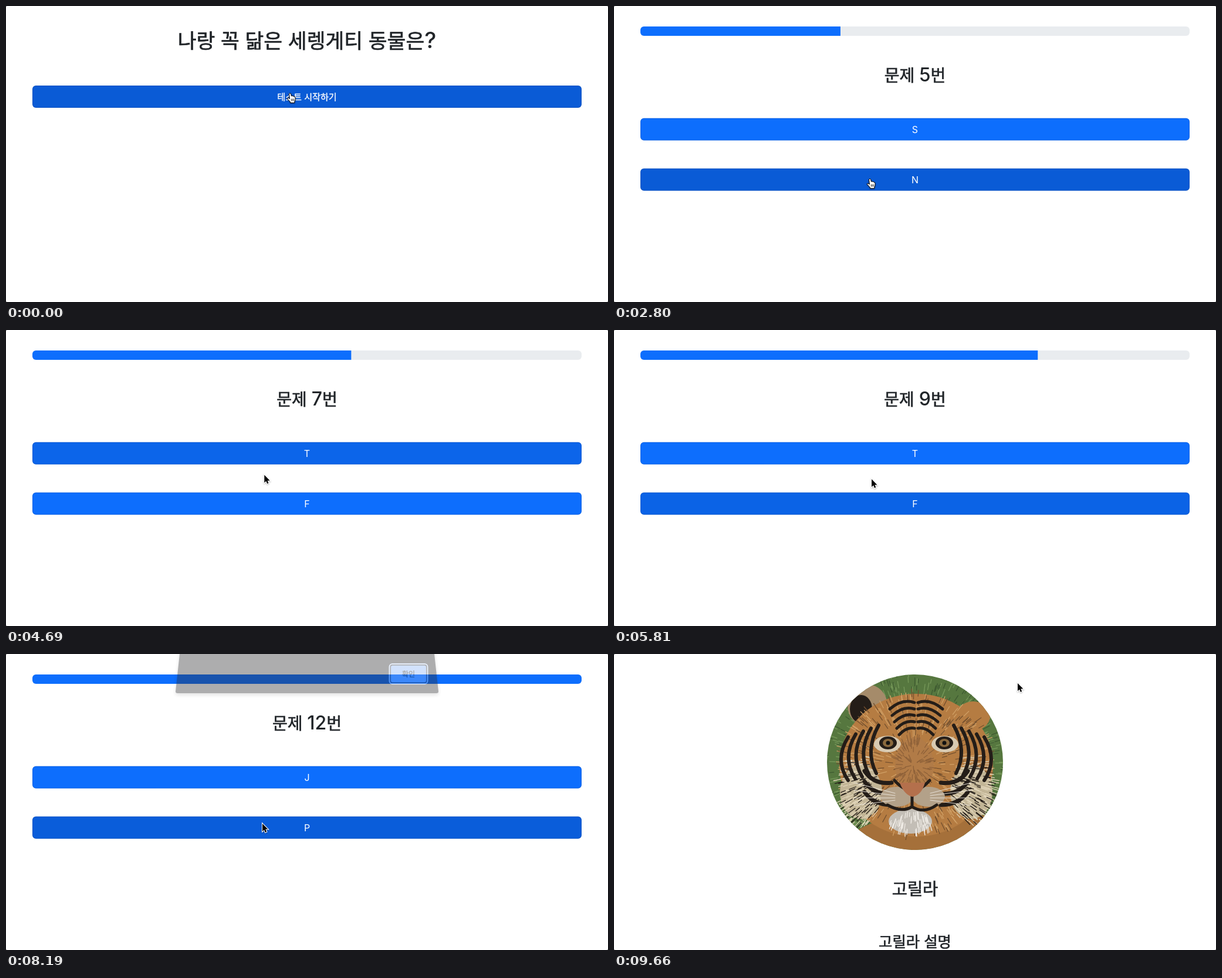
Animation of 1026 by 506 pixels, one loop 9940 ms. Source, as an HTML page:

```html
<!DOCTYPE html>
<html lang="ko">
<head>
<meta charset="utf-8">
<style>
html, body { margin: 0; width: 100%; height: 100%; overflow: hidden; background: #8a8a8a }
svg { display: block; width: 100vw; height: 100vh }
text { font-family: "Noto Sans CJK KR", "Noto Sans CJK", Inter, sans-serif; text-anchor: middle; fill: #212529; stroke: #212529; stroke-width: .7 }
.latin { font-family: Inter, "Noto Sans CJK KR", sans-serif; font-weight: 500; stroke: none }
.label { fill: #fff; stroke: #fff; stroke-width: .35; font-size: 15.1px }
.latin.label { font-size: 16px; font-weight: 400; stroke: none }
.button { x: 45px; width: 936px; height: 38px; rx: 6px }
.edge { x: 45.5px; width: 935px; height: 37px; rx: 5.5px; fill: none; stroke: #003; stroke-opacity: .12 }
</style>
</head>
<body>
<svg viewBox="0 0 1026 506">
  <defs>
    <clipPath id="barClip"><rect x="45" y="35" width="936" height="16" rx="6"/></clipPath>
    <clipPath id="photoClip"><circle cx="513" cy="185" r="150"/></clipPath>
    <filter id="shade" x="-50%" y="-50%" width="220%" height="220%"><feDropShadow dx="0" dy="1" stdDeviation=".8" flood-opacity=".35"/></filter>
    <filter id="lift" x="-10%" y="-20%" width="120%" height="140%"><feDropShadow dx="0" dy="3" stdDeviation="3" flood-opacity=".3"/></filter>
  </defs>
  <rect width="1026" height="506" rx="2.5" fill="#fff"/>

  <g id="intro">
    <text x="513" y="71.5" font-size="34.6">나랑 꼭 닮은 세렝게티 동물은<tspan class="latin" font-size="38">?</tspan></text>
    <rect id="start" class="button" y="136"/>
    <rect class="edge" y="136.5"/>
    <text x="513" y="160.5" class="label">테스트 시작하기</text>
  </g>

  <g id="quiz">
    <g clip-path="url(#barClip)">
      <rect x="45" y="35" width="936" height="16" fill="#e9ecef"/>
      <rect id="bar" x="45" y="35" height="16" fill="#0d6efd"/>
    </g>
    <text id="heading" x="513" y="128.7" font-size="28"></text>
    <rect id="first" class="button" y="191.7"/>
    <rect class="edge" y="192.2"/>
    <text id="firstLabel" x="513" y="216.7" class="latin label"></text>
    <rect id="second" class="button" y="277.7"/>
    <rect class="edge" y="278.2"/>
    <text id="secondLabel" x="513" y="302.7" class="latin label"></text>
  </g>

  <g id="result">
    <g id="photo" clip-path="url(#photoClip)" stroke-linecap="round"></g>
    <text x="513" y="412" font-size="28.5">고릴라</text>
    <text x="513" y="501" font-size="25.4">고릴라 설명</text>
  </g>

  <g id="dialog">
    <path id="panel" fill="#292a2d" filter="url(#lift)"/>
    <g id="ok">
      <rect x="655.5" y="28.5" width="65" height="34" rx="5" fill="none" stroke="#c5d9f8" stroke-width="2"/>
      <rect x="658" y="31" width="60" height="29" rx="3" fill="#8ab4f8"/>
      <text x="688" y="50" font-size="12" style="stroke-width:.3">확인</text>
    </g>
  </g>

  <g id="cursor">
    <path id="arrow" d="M0 0V13.2L3 10.4 4.9 15 7.2 14 5.3 9.6H9.4Z" stroke="#fff" stroke-width="2" paint-order="stroke" filter="url(#shade)"/>
    <g id="hand" stroke="#000" filter="url(#shade)">
      <path d="M-1.5 1Q0-1 1.5 1L2.4 5Q4 4 5 5 6.4 4.6 7 6 9 5.5 9 8V11L7.8 14.5V16.5H.5V15L-4.5 9.5Q-5 7.6-3 8L-.6 9.6Z" fill="#fff"/>
      <path d="M2.4 9.5v4m2-4v4m2-4v4" stroke-width=".8"/>
    </g>
  </g>
</svg>
<script>
const $ = id => document.getElementById(id);
const LOOP = 9940, STEP = 70, ALERT = 8150, DONE = 9310;
// Moment at which each question appears
const starts = [70, 770, 1512, 2110, 2660, 3150, 4230, 4880, 5570, 6380, 7000, 7560];
const labels = ["EI", "SN", "TF", "JP"];

const clamp = u => Math.min(1, Math.max(0, u));
const mix = (a, b, u) => a + (b - a) * u;
const smooth = (from, to, t) => { const u = clamp((t - from) / (to - from)); return u * u * (3 - 2 * u); };
const count = t => starts.filter(s => s <= t).length;

function cursorAt(t) {
  if (t < starts[1]) {
    const u = smooth(350, 680, t);
    return [mix(484, 436, u), mix(149, 297, u)];
  }
  if (t < ALERT) {
    // Rise from the lower answer, higher when there is more time, and return to click
    const n = count(t), from = starts[n - 1], to = starts[n] || ALERT;
    const rise = .106 * (to - from) * smooth(from + 112, from + 372, t) * (1 - smooth(to - 250, to - 80, t));
    return [436 + 23 * (rise / 114) ** 2, 297 - rise];
  }
  const across = smooth(8400, 8680, t), up = smooth(8890, 9240, t);
  return [mix(437, 675, across) + 13 * up, mix(290, 109, across) - 59 * up];
}

// cubic-bezier(.25, .1, .25, 1)
function ease(x) {
  if (x >= 1) return 1;
  let lo = 0, hi = 1, s;
  for (let i = 0; i < 20; i++) {
    s = (lo + hi) / 2;
    if (.75 * s * (1 - s) + s ** 3 < x) lo = s; else hi = s;
  }
  return .3 * s * (1 - s) ** 2 + 3 * s * s * (1 - s) + s ** 3;
}

const over = (top, t) => { const y = cursorAt(t)[1]; return y >= top && y <= top + 38; };

// Hover colour follows the pointer over a 150 ms fade
function paint(id, top, t) {
  t = Math.min(t, ALERT - 20);
  let level = 0;
  for (let i = 0; i < 10; i++) level += over(top, t - i * 15) / 10;
  const pressed = over(top, t) && starts.some(s => Math.abs(t - s) < 60);
  $(id).style.fill = pressed ? "#0a58ca" : `rgb(${mix(13, 10, level)},${mix(110, 91, level)},${mix(253, 214, level)})`;
  return over(top, t);
}

const show = (id, on) => $(id).style.display = on ? "" : "none";

function drawDialog(t) {
  const on = t >= ALERT && t < DONE + 140;
  show("dialog", on);
  if (!on) return;
  const k = t >= DONE ? clamp((t - DONE + 30) / 140) : clamp(1 - (t - ALERT - 40) / 110);
  const low = 78 - 11 * k, inset = 7 * k;
  $("panel").setAttribute("d", `M${289 + inset}-40V0L289 ${low - 3}Q289 ${low} 292 ${low}H734Q737 ${low} 737 ${low - 3}L${737 - inset} 0V-40Z`);
  $("ok").setAttribute("transform", `translate(${-2 * k} ${-11.5 * k})`);
  $("dialog").style.opacity = 1 - .62 * k;
}

// Simplified tiger: soft ovals, mirrored stripes and seeded fur
function buildPhoto() {
  let seed = 7, art = "";
  const rand = () => (seed = seed * 16807 % 2147483647) / 2147483647;
  const oval = (x, y, rx, ry, fill) => art += `<ellipse cx="${x}" cy="${y}" rx="${rx}" ry="${ry}" fill="${fill}"/>`;
  const line = (d, width, color) => art += `<path d="${d}" fill="none" stroke="${color}" stroke-width="${width}"/>`;
  const fur = (x, y, rx, ry, n, color) => {
    let d = "";
    while (n--) {
      const a = rand() * 2 * Math.PI, r = Math.sqrt(rand());
      const px = x + rx * r * Math.cos(a), py = y + ry * r * Math.sin(a);
      const out = Math.atan2(py - 190, px - 510), len = 6 + 8 * rand();
      d += `M${px} ${py}l${len * Math.cos(out)} ${len * Math.sin(out)}`;
    }
    line(d, 1.3, color);
  };
  const dark = "#241d18", cream = "#c2b596", orange = "#b57c42";

  oval(513, 185, 151, 151, "#56773f");
  fur(513, 185, 150, 150, 350, "#77995a");
  fur(513, 185, 150, 150, 250, "#3d5930");
  oval(560, 335, 170, 65, "#a5703a");
  oval(432, 88, 34, 36, "#a58b6a");
  oval(421, 94, 19, 24, dark);
  oval(612, 106, 29, 25, orange);
  oval(515, 190, 131, 122, orange);
  fur(515, 190, 128, 118, 350, "#d0a066");
  fur(515, 190, 128, 118, 220, "#74502e");
  for (const side of [-1, 1]) {
    const x = d => 515 + side * d;
    oval(x(94), 236, 36, 46, cream);
    fur(x(94), 230, 36, 60, 150, "#e0d4b9");
    fur(x(94), 235, 36, 55, 70, dark);
    for (let i = 0; i < 5; i++) {
      line(`M${x(64 + 13 * i)} ${122 + 5 * i}Q${x(88 + 13 * i)} ${165 + 4 * i} ${x(68 + 12 * i)} ${204 + 3 * i}`, 6, dark);
      line(`M${x(3)} ${83 + 11 * i}Q${x(24 - 2 * i)} ${76 + 12 * i} ${x(45 - 4 * i)} ${94 + 11 * i}`, 5, dark);
    }
    for (let i = 0; i < 3; i++) line(`M${x(88)} ${200 + 18 * i}Q${x(72)} ${224 + 17 * i} ${x(42)} ${220 + 19 * i}`, 7, dark);
    oval(x(49), 154, 23, 14, "#d8cab2");
    oval(x(48), 152, 15, 11, dark);
    oval(x(48), 152, 9, 7, "#8b6a3e");
    oval(x(48), 152, 3.5, 3.5, "#111");
  }
  oval(512, 190, 33, 48, "#b17b47");
  fur(512, 185, 28, 42, 100, "#8d6038");
  for (const side of [-1, 1]) {
    oval(509 + side * 27, 244, 28, 17, "#b3a189");
    for (let i = 0; i < 4; i++) line(`M${509 + side * 30} ${238 + 4 * i}l${side * 70} ${9 * i - 18}`, .9, "#eee8df");
  }
  oval(505, 286, 37, 21, "#c3beb6");
  fur(505, 286, 34, 18, 60, "#eeeae4");
  line("M478 216Q508 250 538 216M508 244V260M466 258Q490 272 508 261 528 274 550 258", 5, dark);
  art += `<path d="M487 220H530Q524 242 508 244 494 240 487 220Z" fill="#b4704c"/>`;
  $("photo").innerHTML = art;
}

function draw(t) {
  const intro = t < starts[0], quiz = !intro && t < DONE;
  show("intro", intro);
  show("quiz", quiz);
  show("result", t >= DONE);
  let hover = false;
  if (intro) hover = paint("start", 136, t);
  if (quiz) {
    const n = count(t);
    const grown = n === 1 ? 1 : n - 1 + ease((t - starts[n - 1]) / 600);
    $("bar").setAttribute("width", 78 * grown);
    $("heading").innerHTML = `문제 <tspan class="latin" font-size="32">${n}</tspan>번`;
    [$("firstLabel").textContent, $("secondLabel").textContent] = labels[Math.floor((n - 1) / 3)];
    const a = paint("first", 192, t), b = paint("second", 278, t);
    hover = (a || b) && t < ALERT;
  }
  drawDialog(t);
  show("hand", hover);
  show("arrow", !hover);
  $("cursor").setAttribute("transform", `translate(${cursorAt(t)})`);
}

buildPhoto();
const begin = performance.now();
function tick() {
  const t = (performance.now() - begin) % LOOP;
  draw(Math.floor(t / STEP) * STEP);
  requestAnimationFrame(tick);
}
tick();
</script>
</body>
</html>
```
